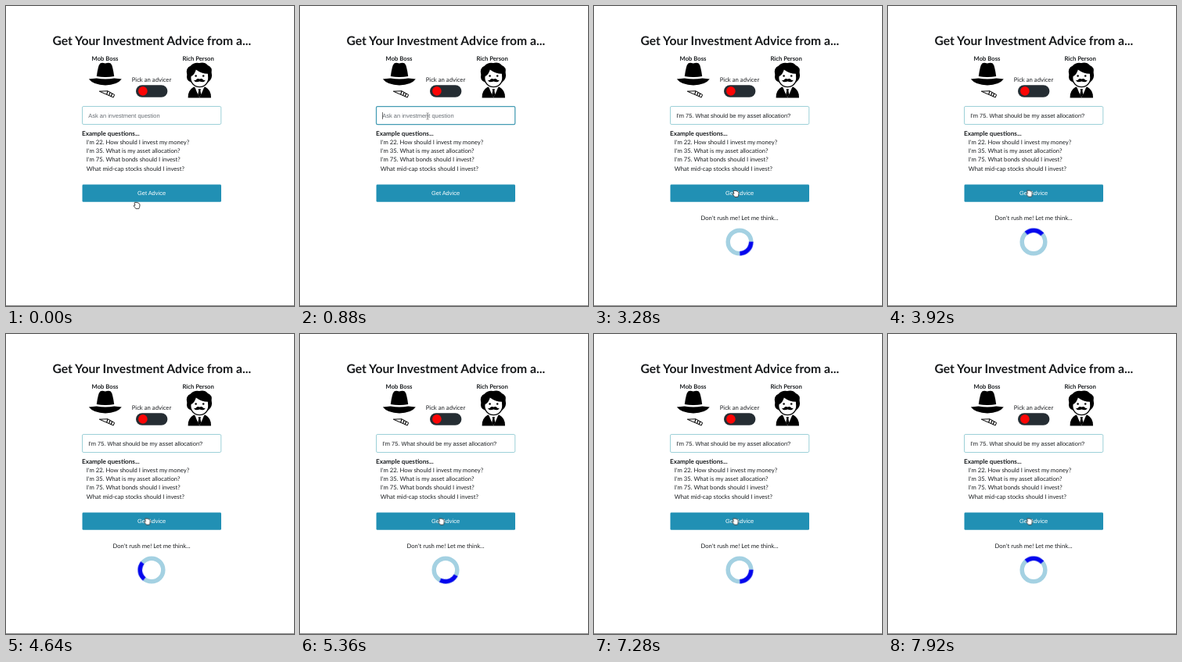
An HTML page that plays this animation: 368x384 px, repeating every 8 s.

```html
<!DOCTYPE html>
<html lang="en">
<head>
<meta charset="utf-8">
<title>Investment Advice</title>
<style>
  html, body { margin: 0; width: 100%; height: 100%; overflow: hidden; background: #fff; }
  svg { display: block; width: 100vw; height: 100vh; }
  text { font: 7.7px Lato, "Open Sans", sans-serif; fill: #1b1e21; text-rendering: geometricPrecision; }
  .title { font-size: 15.7px; font-weight: 700; fill: #17191b; }
  .bold { font-weight: 700; }
  .heading { font-size: 8.15px; }
  .mid { text-anchor: middle; }
  .field { font: 7.48px "Liberation Sans", Arial, sans-serif; }
  .hint { fill: #676d73; }
  .light { fill: #fff; }

  /* One percent of the loop is 80 ms */
  .anim { animation: 8s step-end infinite; }
  .hint { animation-name: hint; }
  .typed { animation-name: typed; }
  .caret-start { animation-name: caret-start; }
  .caret-end { animation-name: caret-end; }
  .busy { animation-name: busy; }
  .hand { animation-name: hand; }
  .beam { animation-name: beam; }
  .frame { animation: focus 8s linear infinite; }
  .pointer { animation: travel 8s ease-in-out infinite; }
  .arc { transform-origin: 186px 302px; animation: spin 8s steps(100) infinite; }

  @keyframes hint { 0% { opacity: 1; } 22%, 100% { opacity: 0; } }
  @keyframes typed { 0% { opacity: 0; } 22%, 100% { opacity: 1; } }
  @keyframes caret-start { 0% { opacity: 0; } 11% { opacity: 1; } 17%, 100% { opacity: 0; } }
  @keyframes caret-end {
    0% { opacity: 0; } 22% { opacity: 1; } 28% { opacity: 0; }
    34% { opacity: 1; } 37%, 100% { opacity: 0; }
  }
  @keyframes busy { 0% { opacity: 0; } 37%, 100% { opacity: 1; } }
  @keyframes hand { 0% { opacity: 1; } 4% { opacity: 0; } 33%, 100% { opacity: 1; } }
  @keyframes beam { 0% { opacity: 0; } 4% { opacity: 1; } 33%, 100% { opacity: 0; } }
  @keyframes focus {
    0%, 9% { stroke: #9dd0d8; stroke-width: 1; }
    11%, 36% { stroke: #459cb4; stroke-width: 1.25; }
    39%, 100% { stroke: #9dd0d8; stroke-width: 1; }
  }
  @keyframes travel {
    0%, 1% { transform: translate(167px, 255px); }
    9%, 25% { transform: translate(163px, 141px); }
    28% { transform: translate(174px, 195px); }
    35%, 47% { transform: translate(181px, 240px); }
    48%, 100% { transform: translate(180.4px, 239.7px); }
  }
  @keyframes spin { from { transform: rotate(33deg); } to { transform: rotate(2913deg); } }
</style>
</head>
<body>
<svg viewBox="0 0 368 384">
  <text class="title mid" x="186.3" y="50">Get Your Investment Advice from a...</text>
  <text class="bold mid" x="126.5" y="70">Mob Boss</text>
  <text class="bold mid" x="245.6" y="70">Rich Person</text>
  <text class="mid" x="186" y="97">Pick an advicer</text>

  <!-- Hat and cigar -->
  <g>
    <path d="M115.8 90Q117.6 76 120.3 73.4Q123 72 126.8 73.6Q131 72 133.8 73.4Q136.4 76 138.2 90Q127 92 115.8 90Z"/>
    <path d="M105.8 93.6Q111 93.2 115.6 92.6Q127 94.6 138.4 92.6Q143 93.2 147.8 93.6Q142 101.4 127 101.4Q112 101.4 105.8 93.6Z"/>
    <path d="M119.3 109.2L130 108.8L138.6 113.6L137.2 117L128.4 113.2Z" fill="#fff" stroke="#000" stroke-width="1" stroke-linejoin="round"/>
    <path d="M130 108.8L128.6 113.4M133 110.6L131.6 114.6M135.6 112L134.2 115.8" stroke="#000" stroke-width="1.2"/>
  </g>

  <!-- Gentleman -->
  <g>
    <path d="M232.6 117.6Q232 108 240 103.5L247.3 106L254.5 103.5Q262.6 108 262 117.6Z"/>
    <path d="M240.8 102.5H253.8L250.7 110L247.3 117.3L243.8 110Z" fill="#fff"/>
    <path d="M245.6 106.2H249L248.4 108.6L249.4 113.5L247.3 117L245.2 113.5L246.2 108.6Z"/>
    <path d="M236.2 97.5Q229.5 95 231.3 88Q229 79.5 236 76.5Q240 71.8 247 73Q254 71.2 258 76Q264 78.5 262.6 85Q264.6 93 258.4 97.5Z"/>
    <circle cx="247.3" cy="92" r="12.2"/>
    <path d="M236.6 90Q241 88 242.8 81.5Q250 86.8 257.9 86.8L258.2 92A10.9 10.9 0 0 1 236.4 92Z" fill="#fff"/>
    <circle cx="242.6" cy="89.6" r="1.25"/>
    <circle cx="252.2" cy="89.6" r="1.25"/>
    <path d="M247.4 93.6Q250 92.2 252 94.4Q253.4 95.7 255.2 94.6Q253.2 98.7 247.4 96.6Q241.6 98.7 239.6 94.6Q241.4 95.7 242.8 94.4Q244.8 92.2 247.4 93.6Z"/>
  </g>

  <!-- Switch -->
  <rect x="166" y="101.2" width="40.4" height="15.6" rx="7.8" fill="#252d33"/>
  <circle cx="174.9" cy="108.9" r="5.8" fill="#fb0505"/>

  <!-- Question field -->
  <rect class="frame" x="97.5" y="128.5" width="177.3" height="23" rx="1.6" fill="#fff"/>
  <text class="field hint anim" x="105.3" y="142.5">Ask an investment question</text>
  <text class="field typed anim" x="105.3" y="142.5">I'm 75. What should be my asset allocation?</text>
  <path class="caret-start anim" d="M105.5 136V145" stroke="#333" stroke-width=".7"/>
  <path class="caret-end anim" d="M251.6 136V145" stroke="#333" stroke-width=".7"/>

  <text class="bold heading" x="97" y="165.6">Example questions...</text>
  <text x="102.8" y="176.7">I'm 22. How should I invest my money?</text>
  <text x="102.8" y="188">I'm 35. What is my asset allocation?</text>
  <text x="102.8" y="199.3">I'm 75. What bonds should I invest?</text>
  <text x="102.8" y="210.6">What mid-cap stocks should I invest?</text>

  <rect x="97.5" y="228.5" width="177.5" height="22.3" rx="1.4" fill="#2190b4"/>
  <text class="field light mid" x="186" y="242.1">Get Advice</text>

  <!-- Waiting state -->
  <g class="busy anim">
    <text class="mid" x="186" y="274.3">Don't rush me! Let me think...</text>
    <g fill="none" stroke-width="5.5">
      <circle cx="186" cy="302" r="14.8" stroke="#a4d1e2"/>
      <path class="arc" d="M175.535 291.535A14.8 14.8 0 0 1 196.465 291.535" stroke="#0505ee"/>
    </g>
  </g>

  <g class="pointer">
    <path class="hand anim" d="M-2 .2L-2.9 -2.8Q-2.4 -4.6 -1 -3.4Q.2 -4.4 1 -3Q2.4 -3.6 2.8 -2.2Q4.2 -2 4 0Q3.9 2.4 2.8 4.4H-1.2Q-2.4 2.6 -3.8 .9Q-3.6 -.4 -2 .2Z" fill="#fff" stroke="#333" stroke-width=".9" stroke-linejoin="round"/>
    <path class="beam anim" d="M-1.5 -4.2Q0 -4.2 0 -3.2Q0 -4.2 1.5 -4.2M0 -3.2V3.2M-1.5 4.2Q0 4.2 0 3.2Q0 4.2 1.5 4.2" fill="none" stroke="#555" stroke-width=".6"/>
  </g>

  <rect y="383" width="368" height="1" fill="#8c8c8c"/>
</svg>
</body>
</html>
```
